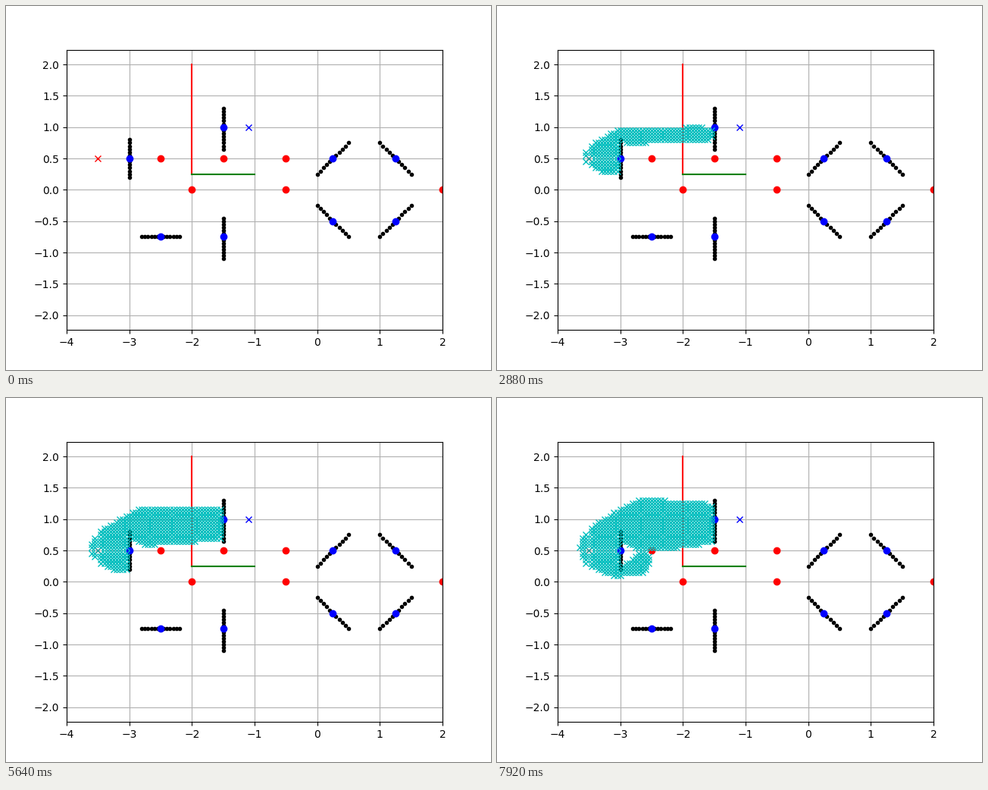
A matplotlib script for the animation above (8 s loop, 640 by 480 pixels).

```python
import math
from itertools import product

import matplotlib.pyplot as plt
import numpy as np
from matplotlib.animation import FuncAnimation

CELL = 0.05
START, GOAL = (-3.5, 0.5), (-1.1, 1.0)
FRAME_MS, FRAMES = 40, 200
FRAMES_PER_STEP, CELLS_PER_STEP = 3, 10


def to_cell(point):
    return tuple(int(round(v / CELL)) for v in point)


def bar(center, direction, back, ahead):
    """Wall points one cell apart on both sides of the center."""
    k = np.arange(-back, ahead + 1)[:, None]
    return np.array(center) + k * CELL * np.array(direction)


def search(start, goal, blocked, limit):
    """Cells in the order in which A* expands them."""
    moves = sorted(product((-1, 0, 1), repeat=2), key=lambda m: math.hypot(*m))[1:]
    cost = {start: 0.0}
    rank = {start: 0.0}      # open cells: cost plus distance to the goal
    closed = {}
    while rank and len(closed) < limit:
        cell = min(rank, key=rank.get)
        del rank[cell]
        closed[cell] = True
        if cell == goal:
            break
        for dx, dy in moves:
            new = (cell[0] + dx, cell[1] + dy)
            if new in closed or new in blocked:
                continue
            g = cost[cell] + math.hypot(dx, dy)
            if new not in rank or g < cost[new]:
                cost[new] = g
                rank[new] = g + math.dist(new, goal)
    return np.array(list(closed))


# Each wall has a blue dot at its center
walls = {}
for center in [(-1.5, 1), (-1.5, -0.75)]:
    walls[center] = bar(center, (0, 1), 7, 6)
for center, direction in [((-3, 0.5), (0, 1)), ((-2.5, -0.75), (1, 0))]:
    walls[center] = bar(center, direction, 6, 6)
for sx, sy in product((-1, 1), repeat=2):
    center = (0.75 + sx / 2, sy / 2)
    walls[center] = bar(center, (1, -sx * sy), 5, 5)
wall_points = np.vstack(list(walls.values()))

start = to_cell(START)
blocked = {to_cell(p) for p in wall_points}
cells = search(start, to_cell(GOAL), blocked,
               FRAMES // FRAMES_PER_STEP * CELLS_PER_STEP)
# Cells in the start's row or column are searched but not marked
marked = (cells != start).all(axis=1)

fig, ax = plt.subplots(figsize=(6.4, 4.8), dpi=100)
ax.grid(True)
ax.plot(*wall_points.T, ".k")
ax.plot(*START, "xr")
ax.plot(*GOAL, "xb")
ax.plot(*zip(*walls), "ob")
ax.plot([-2.5, -1.5, -0.5], [0.5] * 3, "or")
ax.plot([-2, -0.5, 2], [0] * 3, "or")
ax.plot([-2, -2], [2, 0.25], "r")
ax.plot([-2, -1], [0.25, 0.25], "g")
trail, = ax.plot([], [], "xc")

# Same scale on both axes
box = ax.get_position()
half = 3 * (box.height * 4.8) / (box.width * 6.4)
ax.set_xlim(-4, 2)
ax.set_ylim(-half, half)


def init():
    trail.set_data([], [])
    return trail,


def update(frame):
    n = frame // FRAMES_PER_STEP * CELLS_PER_STEP
    trail.set_data(*(CELL * cells[:n][marked[:n]]).T)
    return trail,


anim = FuncAnimation(fig, update, frames=FRAMES, init_func=init,
                     interval=FRAME_MS, repeat=True, repeat_delay=0)
plt.show()
```
